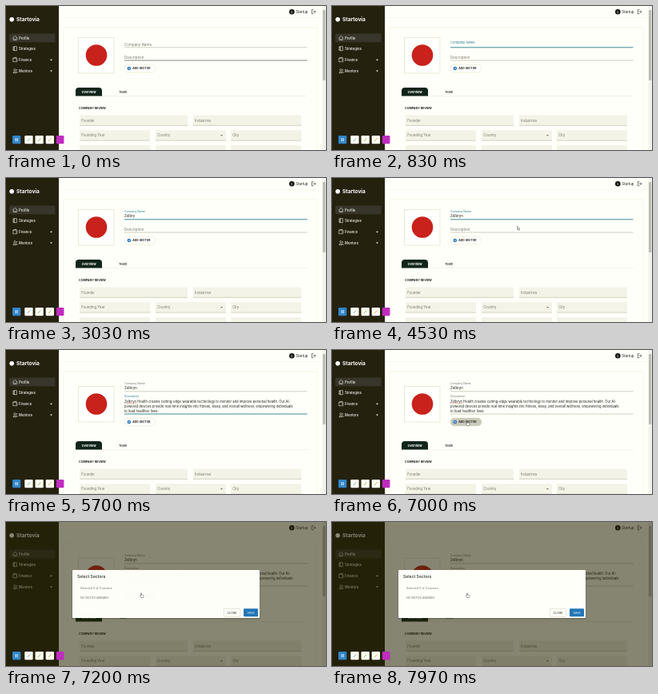
Recreate the animation shown at these times as an HTML page. Size 400 by 180 pixels, loop 8 s.

```html
<!DOCTYPE html>
<html lang="en">
<head>
<meta charset="utf-8">
<title>Startup profile form</title>
<style>
  html, body { margin: 0; width: 100%; height: 100%; overflow: hidden; background: #fffffa; }
  svg { display: block; width: 100%; height: 100%; font-family: Inter, "Open Sans", sans-serif; }
</style>
</head>
<body>
<svg id="stage" viewBox="0 0 400 180"></svg>
<script>
const LOOP = 8000;
const NAME = 'Zelbryn';
const DESCRIPTION = [
  NAME + ' Health creates cutting-edge wearable technology to monitor and improve personal health. Our AI-',
  'powered devices provide real-time insights into fitness, sleep, and overall wellness, empowering individuals',
  'to lead healthier lives.'
];
const INK = '#22221c', MUTED = '#77776a', TEAL = '#287f88', BLUE = '#2176b8', FILL = '#f3f3e8';

// Moments of the interaction, in ms
const FOCUS_NAME = 800, TYPE_START = 1900, TYPE_STEP = 190;
const FOCUS_DESC = 4660, PASTE = 5150, HOVER = 6700, OPEN = 7070;

const text = (x, y, str, size, fill = INK, extra = '') =>
  `<text x="${x}" y="${y}" font-size="${size}" fill="${fill}" ${extra}>${str}</text>`;
const rect = (x, y, w, h, fill, extra = '') =>
  `<rect x="${x}" y="${y}" width="${w}" height="${h}" fill="${fill}" ${extra}/>`;
const path = (d, stroke, width = .6, extra = '') =>
  `<path d="${d}" fill="none" stroke="${stroke}" stroke-width="${width}" ${extra}/>`;
const circle = (x, y, r, fill) => `<circle cx="${x}" cy="${y}" r="${r}" fill="${fill}"/>`;
const arrow = (x, y, fill) => `<path d="M${x - 1.5} ${y}h3l-1.5 1.7z" fill="${fill}"/>`;
const BOLD = 'font-weight="700"', MID = 'text-anchor="middle"';

const menuIcons = [
  'M8.5 40l2.8-2.6 2.8 2.6M9.2 39.5v3h4.2v-3M11.3 42.5v-1.7',
  'M9.2 50.7h4.2v5h-4.2zM10.4 50.7v5M8.6 52h1.2M8.6 54.4h1.2',
  'M8.8 65.2h5v4.5h-5zM8.8 65.2l3.8-1v1M12 67.4h1.8',
  'M9.2 83.7v-1.2q1.8-1.4 3.6 0v1.2zM11 78.6a1.2 1.2 0 1 0 .01 0M13 79q1.4 1 0 2.2M13.5 82l1 1.7'
];

function sidebar() {
  const items = ['Profile', 'Strategies', 'Finance', 'Mentors'].map((label, i) => {
    const y = 40 + i * 13.8;
    return path(menuIcons[i], '#f1f1e6') + text(16, y + 1.5, label, 4.3, '#f7f7ee', 'font-weight="500"') +
      (i > 1 ? arrow(56.5, y - .8, '#f1f1e6') : '');
  }).join('');
  return rect(0, 0, 66, 180, '#25210f') + circle(7.2, 16.8, 2.8, '#fff') +
    text(13, 19.2, 'Startovia', 6.5, '#fff', BOLD) +
    rect(4, 34.5, 57.5, 10.8, '#38362a', 'rx="1.5"') + items;
}

function header() {
  return path('M66 14.5H395', '#f3f3dc', .5) + circle(357.3, 7.2, 3.3, '#151510') +
    text(357.3, 8.6, 'S', 3.8, '#fff', MID) + text(362.3, 8.8, 'Startup', 4.4) +
    path('M384.5 4.7h-2.3v5h2.3M383.7 7.2h3.3M385.6 5.8l1.4 1.4-1.4 1.4', INK) +
    path('M72 180V27H389V180', '#eeeecb', .5) +
    rect(395.5, 0, 4.5, 180, '#f2f2ec') + rect(396, 5, 3.3, 88, '#bdbdb2', 'rx="1"');
}

function inputBox(x, y, w, label, select) {
  return rect(x, y, w, 13, FILL, 'rx="1"') + path(`M${x} ${y + 12.8}h${w}`, '#a9a990', .5) +
    text(x + 2.2, y + 8, label, 4.3, MUTED) + (select ? arrow(x + w - 5.5, y + 5.8, MUTED) : '');
}

function lowerForm() {
  return `<g id="sector">
      <rect id="sectorBg" x="148" y="73" width="39" height="10" rx="5" stroke="#dcdcb8" stroke-width=".5"/>
      ${circle(153.8, 78, 2.3, BLUE)}${path('M152.6 78h2.4M153.8 76.8v2.4', '#fff', .5)}
      ${text(158.3, 79.3, 'ADD SECTOR', 3.45, INK, BOLD)}</g>` +
    path('M87 112.5H377', '#e6e6cf', .5) +
    `<path d="M87 112.5v-6.5q0-4 4-4h25q4 0 4 4v6.5z" fill="#10251a"/>` +
    text(103.6, 109.3, 'Overview', 3.9, '#fff', BOLD + MID.padStart(MID.length + 1)) +
    text(141, 109.3, 'Team', 3.9, INK, 'font-weight="500"') +
    text(91, 128.9, 'COMPANY REVIEW', 3.6, INK, BOLD) +
    inputBox(92, 136.5, 135, 'Founder') + inputBox(234, 136.5, 135, 'Industries') +
    inputBox(92, 155.3, 88, 'Founding Year') + inputBox(187, 155.3, 88, 'Country', true) +
    inputBox(281, 155.3, 88, 'City') +
    [92, 187, 281].map(x => inputBox(x, 174, 88, '')).join('');
}

function toolbar() {
  const marks = ['#4a8ec2', '#78a44c', '#b0a83c'];
  return rect(8, 162, 10.3, 10.3, '#3185c8', 'rx="1.2"') + path('M12.1 165v4.3M14.2 165v4.3', '#fff', .9) +
    marks.map((color, i) => {
      const x = 23.3 + i * 13.2;
      return rect(x, 162, 10.3, 10.3, '#fffff2', 'rx="1.2"') +
        path(`M${x + 3.5} 169l3.3-3.6`, color, .8);
    }).join('') + rect(62.8, 162, 9.6, 10.3, '#c02bc0', 'rx="1.2"');
}

function dialog() {
  return rect(82.5, 60.5, 235, 61, '#000', 'rx="1.5" opacity=".2"') +
    rect(83, 60, 234, 60, '#fffffa', 'rx="1"') +
    text(89, 69.8, 'Select Sectors', 5.1, INK, 'font-weight="500"') +
    text(93, 84.4, 'Selected 0 of 5 sectors', 3.6, MUTED) +
    text(93, 95.8, 'No sectors available', 3.7, MUTED) +
    rect(272.3, 108.3, 20.5, 10, '#fffffa', 'rx="1" stroke="#c9c9ac" stroke-width=".5"') +
    text(282.5, 114.7, 'CLOSE', 3.6, INK, MID) +
    rect(297, 108.3, 18, 10, BLUE, 'rx="1"') + text(306, 114.7, 'SAVE', 3.6, '#fff', MID);
}

document.getElementById('stage').innerHTML =
  rect(0, 0, 400, 180, '#fffffa') + header() +
  `<g id="media">${rect(90.5, 39.5, 44.5, 44.5, '#fffffd', 'stroke="#dedeb8" stroke-width=".6"')}
    ${circle(113, 61.5, 13.3, '#c9211b')}</g>
  <text id="nameLabel" x="148">Company Name</text>
  <text id="nameValue" x="148" y="49.4" font-size="4.4" fill="${INK}"></text>
  <path id="nameLine" d="M148 51.8H376.5"/>
  <text id="descLabel" x="148">Description</text>
  <g id="descValue">${DESCRIPTION.map((line, i) => text(148, 65.8 + i * 6, line, 4.15)).join('')}
    ${path('M148 66.9' + 'q.5-.8 1 0t1 0'.repeat(8), '#d84c40', .4)}</g>
  <path id="descLine" d="M148 68H376.5"/>
  <g id="lower">${lowerForm()}</g>` +
  sidebar() +
  rect(0, 0, 400, 180, 'rgb(36,34,4)', 'id="backdrop"') + `<g id="dialog">${dialog()}</g>` + toolbar() +
  `<path id="pointer" d="M0 0v4.6l1.1-1 .9 1.9.8-.4-.9-1.8h1.5z" fill="#fff" stroke="#222" stroke-width=".4"/>
  <path id="hand" d="M0 0q.7-.7 1 0v2l2.2.6q.5.3.3 1l-.5 2h-2.5l-1.6-2.2.5-.5.6.6z" fill="#fff" stroke="#222" stroke-width=".4"/>`;

const el = Object.fromEntries([...document.querySelectorAll('[id]')].map(node => [node.id, node]));
const set = (id, attrs) => Object.entries(attrs).forEach(([key, value]) => el[id].setAttribute(key, value));
const show = (id, on) => set(id, { visibility: on ? 'visible' : 'hidden' });
const clamp = v => Math.max(0, Math.min(1, v));
const ease = v => 1 - (1 - clamp(v)) ** 3;
const mix = (a, b, p) => a + (b - a) * p;
const moveTo = (id, x, y) => set(id, { transform: `translate(${x} ${y})` });

function field(prefix, t, focusAt, top, focused, hovered) {
  const p = ease((t - focusAt) / 200);
  set(prefix + 'Label', {
    y: mix(top + 9.6, top + 2.8, p), 'font-size': mix(4.5, 3.4, p), fill: focused ? TEAL : MUTED
  });
  set(prefix + 'Line', {
    stroke: focused ? TEAL : hovered ? INK : '#a5a58c', 'stroke-width': focused ? .9 : .55
  });
}

function render(t) {
  const pasted = t >= PASTE, shift = pasted ? 12 : 0;
  field('name', t, FOCUS_NAME, 40, t >= FOCUS_NAME && t < FOCUS_DESC, false);
  field('desc', t, FOCUS_DESC, 56.3, t >= FOCUS_DESC && t < OPEN - 100, t < 500);
  el.nameValue.textContent = NAME.slice(0, Math.max(0, Math.ceil((t - TYPE_START) / TYPE_STEP)));
  show('descValue', pasted);
  moveTo('descLine', 0, shift);
  moveTo('media', 0, shift / 2);
  moveTo('lower', 0, shift);
  set('sectorBg', { fill: t >= HOVER ? '#c9c9bd' : '#fffffd' });

  const fade = t < OPEN ? 0 : mix(.52, 1, ease((t - OPEN) / 180));
  set('backdrop', { opacity: .55 * fade });
  set('dialog', { opacity: fade });

  const glide = clamp((t - 6000) / 700), p = glide * glide * (3 - 2 * glide);
  const enter = ease((t - 4100) / 400);
  moveTo('pointer', mix(mix(240, 231.5, enter), 168, p), mix(mix(53, 60, enter), 89, p));
  moveTo('hand', 168.5, 89);
  show('pointer', (t >= 4100 && t < 5000) || (t >= 5900 && t < HOVER));
  show('hand', t >= HOVER);
}

function tick() {
  render(performance.now() % LOOP);
  requestAnimationFrame(tick);
}
tick();
</script>
</body>
</html>
```
